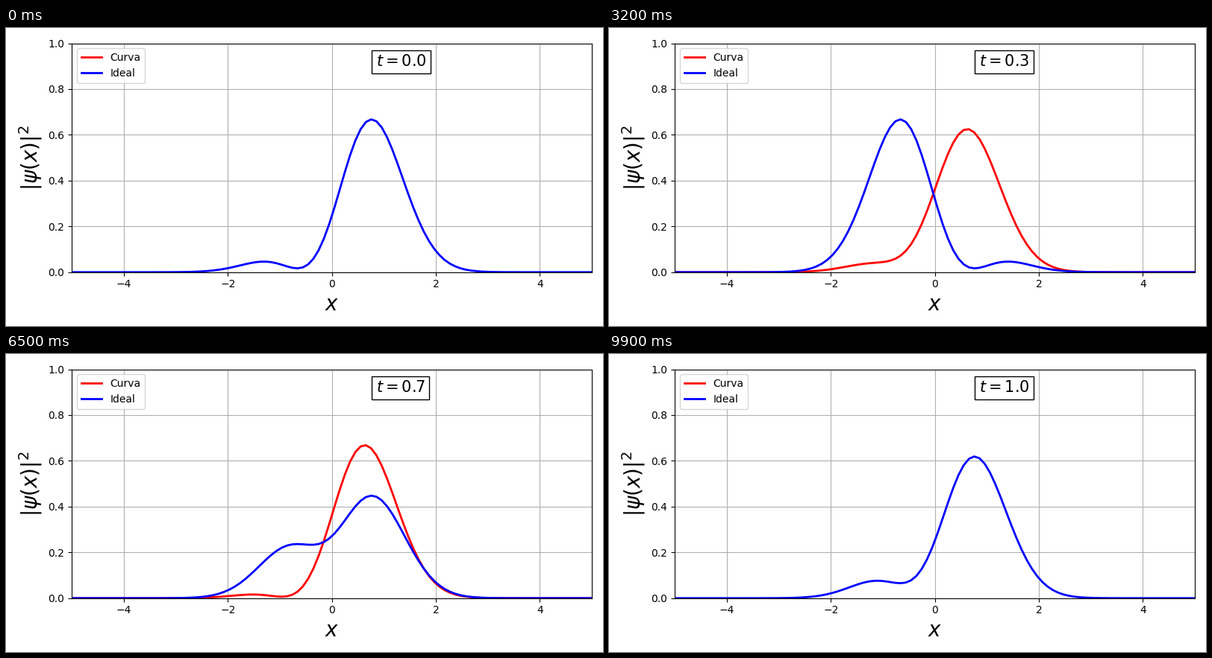
These frames come from a looping animation (800 by 400 pixels, 10 s). A matplotlib script:

```python
import numpy as np
import matplotlib.pyplot as plt
from matplotlib.animation import FuncAnimation

FRAMES = 100
INTERVAL = 100  # ms

x = np.linspace(-5, 5, 100)
x_ideal = -5 + 0.1 * np.arange(100)
times = np.linspace(0, 1, FRAMES)


def density(x, a, b, phase):
    """|a*phi0 + b*exp(-i*phase)*phi1|^2 for the harmonic oscillator."""
    mix = a**2 + 2 * b**2 * x**2 + 2 * np.sqrt(2) * a * b * x * np.cos(phase)
    return np.exp(-x**2) / np.sqrt(np.pi) * mix


def ideal(n):
    return density(x_ideal, np.sqrt(0.5), np.sqrt(0.5), np.pi / 10 * (n - 1))


def curved(n):
    # Defined only strictly inside the time interval
    if n in (0, FRAMES - 1):
        return np.full_like(x, np.nan)
    return density(x, 0.8, 0.6, np.radians(34.07 * (n - 1.25)))


fig, ax = plt.subplots(figsize=(8, 4), dpi=100)
red, = ax.plot(x, curved(0), color="red", lw=2, label="Curva")
blue, = ax.plot(x, ideal(0), color="blue", lw=2, label="Ideal")
clock = ax.text(0.85, 0.9, "$t=0.0$", fontsize=15,
                bbox=dict(facecolor="white", edgecolor="black"))
ax.set_xlim(-5, 5)
ax.set_ylim(0, 1)
ax.set_xlabel("$x$", fontsize=20)
ax.set_ylabel(r"$|\psi(x)|^2$", fontsize=20)
ax.legend(loc="upper left")
ax.grid(True)
fig.tight_layout()


def update(n):
    red.set_ydata(curved(n))
    blue.set_ydata(ideal(n))
    clock.set_text(f"$t={times[n]:.1f}$")
    return red, blue, clock


anim = FuncAnimation(fig, update, frames=FRAMES, interval=INTERVAL,
                     repeat=True, repeat_delay=0)
plt.show()
```
